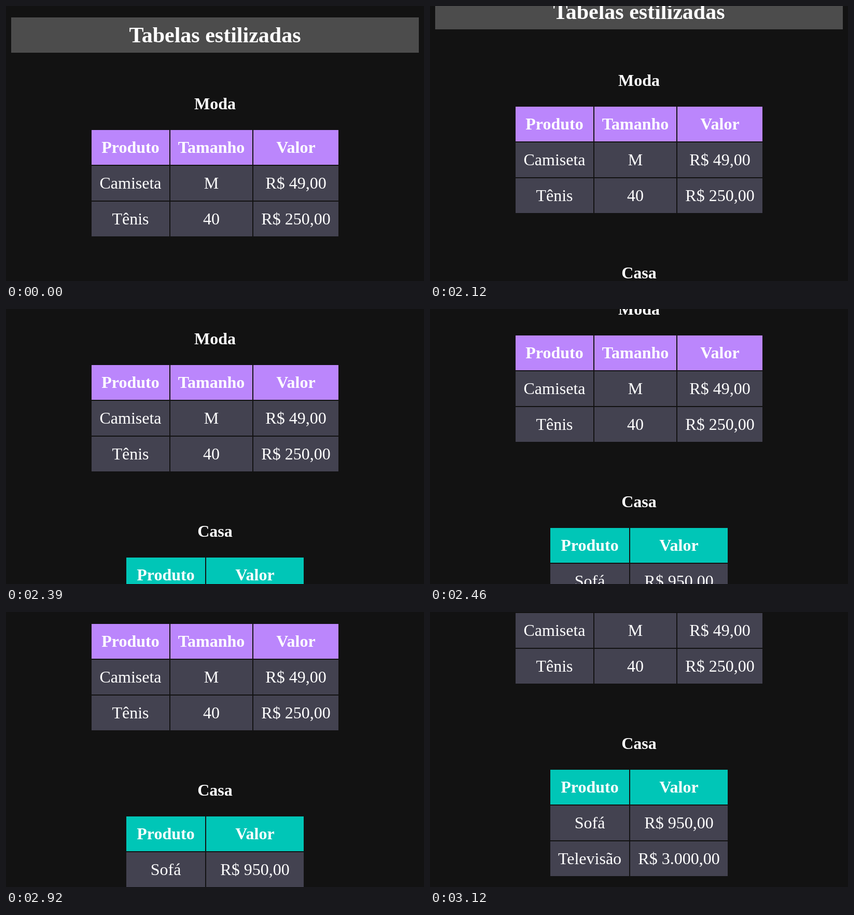
Animation of 806x530 px, one loop 5.25 s. Source, as an HTML page:

```html
<!DOCTYPE html>
<html lang="pt-BR">
<head>
<meta charset="utf-8">
<title>Tabelas estilizadas</title>
<style>
  html, body { margin: 0; width: 100%; height: 100%; overflow: hidden; background: #121212; }
  body { position: relative; color: #fff; font: 32px/37px "Liberation Serif", "Times New Roman", serif; text-align: center; }
  #page { position: absolute; left: 0; top: 0; width: 806px; height: 836px; }
  h1 { position: absolute; left: 10px; top: 22px; width: 786px; margin: 0; padding: 10px 0; background: #4c4c4c; font-size: 42px; line-height: 48px; }
  table { position: absolute; table-layout: fixed; border-collapse: separate; border-spacing: 2px; }
  caption { padding: 30px 0; font-weight: bold; }
  th, td { box-sizing: border-box; height: 67px; padding: 15px 0; white-space: nowrap; }
  td { background: #434250; }
  .fashion { left: 163px; top: 140px; width: 480px; }
  .fashion th { background: #bb86fc; }
  .home { left: 230px; top: 511px; width: 346px; }
  .home th { background: #00c6b7; }
</style>
</head>
<body>
<div id="page">
  <h1>Tabelas estilizadas</h1>
  <table class="fashion">
    <caption>Moda</caption>
    <colgroup><col style="width:150px"><col style="width:158px"><col style="width:164px"></colgroup>
    <tr><th>Produto</th><th>Tamanho</th><th>Valor</th></tr>
    <tr><td>Camiseta</td><td>M</td><td>R$ 49,00</td></tr>
    <tr><td>Tênis</td><td>40</td><td>R$ 250,00</td></tr>
  </table>
  <table class="home">
    <caption>Casa</caption>
    <colgroup><col style="width:152px"><col style="width:188px"></colgroup>
    <tr><th>Produto</th><th>Valor</th></tr>
    <tr><td>Sofá</td><td>R$ 950,00</td></tr>
    <tr><td>Televisão</td><td>R$ 3.000,00</td></tr>
  </table>
</div>
<script>
  const LOOP = 5250;
  // Three wheel notches, each eased but shown in discrete steps: [time in ms, scroll offset]
  const scrollSteps = [
    [0, 0],
    [2060, 4], [2120, 45], [2190, 95], [2260, 100],
    [2390, 131], [2460, 188], [2530, 200],
    [2920, 216], [2990, 279], [3060, 304], [3120, 306],
  ];
  const page = document.getElementById("page");
  const start = performance.now();

  function draw(now) {
    const time = Math.max(0, now - start) % LOOP;
    const [, offset] = scrollSteps.findLast(([at]) => at <= time);
    page.style.top = -offset + "px";
    requestAnimationFrame(draw);
  }
  draw(start);
</script>
</body>
</html>
```
